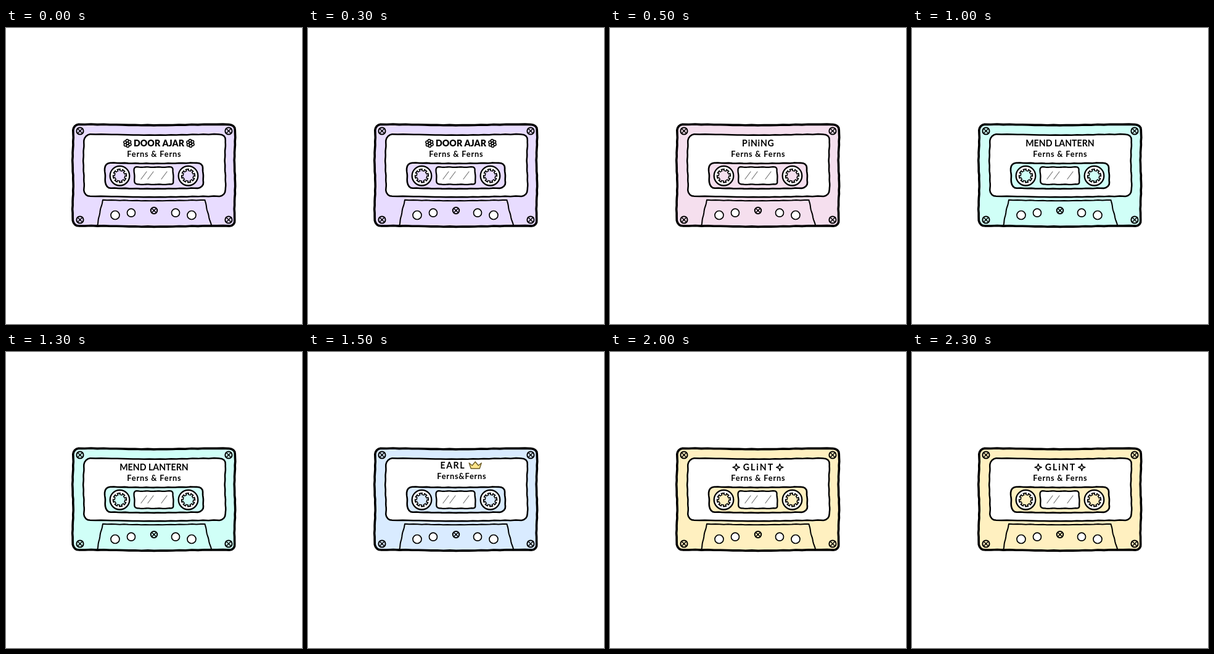
Write an HTML page with a canvas that moves like this. It is 480 by 480 pixels and loops after 2.5 s.

```html
<!DOCTYPE html>
<html lang="en">
<head>
<meta charset="utf-8">
<title>Cassettes</title>
<style>
  html, body { margin: 0; width: 100%; height: 100%; overflow: hidden; background: #fff; }
  canvas { display: block; }
</style>
</head>
<body>
<canvas id="stage" width="480" height="480"></canvas>
<script>
const ctx = document.getElementById('stage').getContext('2d');
const SIZE = 480, MID = SIZE / 2, HOLD = 500, TAU = Math.PI * 2;
const INK = '#000', PAPER = '#fff';

const tapes = [
  { tint: '#e8dcff', title: 'DOOR AJAR', x: 248, weight: 900, ornament: flower, paired: true },
  { tint: '#f5dfee', title: 'PiNiNG', gap: 0.8 },
  { tint: '#d0fff7', title: 'MEND LANTERN' },
  { tint: '#d9ebff', title: 'EARL', x: 234, gap: 1.5, lift: 3, ornament: crown,
    artist: 'Ferns&Ferns', artistX: 249 },
  { tint: '#fff0c0', title: 'GLiNT', gap: 2, ornament: sparkle, paired: true }
];

const polar = (x, y, r, a) => [x + r * Math.cos(a), y + r * Math.sin(a)];

function paint(fill, width, color = INK) {
  if (fill) { ctx.fillStyle = fill; ctx.fill(); }
  if (width) { ctx.strokeStyle = color; ctx.lineWidth = width; ctx.stroke(); }
}

function poly(points, closed = true) {
  ctx.beginPath();
  for (const [x, y] of points) ctx.lineTo(x, y);
  if (closed) ctx.closePath();
}

function line(from, to, width, color) {
  poly([from, to], false);
  paint(null, width, color);
}

function disc(x, y, r, fill, width) {
  ctx.beginPath();
  ctx.arc(x, y, r, 0, TAU);
  paint(fill, width);
}

// A smooth displacement that makes long lines look drawn by hand.
function unsteady([x, y]) {
  return [
    x + 0.6 * Math.sin(y * 0.08) + 0.25 * Math.sin(y * 0.4),
    y + 0.7 * Math.cos((x - MID) * 0.03) + 0.25 * Math.sin(x * 0.35)
  ];
}

function sketch(corners, closed = true) {
  const points = [], steps = 24;
  corners.forEach(([x, y], i) => {
    const next = corners[i + 1] || (closed ? corners[0] : [x, y]);
    for (let s = 0; s < steps; s++) {
      const k = s / steps;
      points.push(unsteady([x + (next[0] - x) * k, y + (next[1] - y) * k]));
    }
  });
  poly(points, closed);
}

function box(left, top, right, bottom, radius, fill, width) {
  const points = [], arcSteps = 4;
  for (let corner = 0; corner < 4; corner++) {
    const x = corner % 3 ? right - radius : left + radius;
    const y = corner < 2 ? top + radius : bottom - radius;
    for (let s = 0; s <= arcSteps; s++)
      points.push(polar(x, y, radius, (corner + 2 + s / arcSteps) * TAU / 4));
  }
  sketch(points);
  paint(fill, width);
}

function screw(x, y, r, tint) {
  disc(x, y, r, tint, 2);
  for (let i = 0; i < 2; i++) {
    const a = (i + 0.5) * TAU / 4;
    line(polar(x, y, r * 0.75, a), polar(x, y, -r * 0.75, a), 1.6);
  }
}

function reel(x, y, tint) {
  disc(x, y, 15.8, PAPER, 2.3);
  disc(x, y, 10.8, tint, 1.8);
  const notches = 8;
  ctx.lineCap = 'butt';
  for (const [inner, outer, width, color] of [[7.5, 11, 5, INK], [9, 13, 2.2, PAPER]])
    for (let i = 0; i < notches; i++) {
      const a = (i + 0.3) * TAU / notches;
      line(polar(x, y, inner, a), polar(x, y, outer, a), width, color);
    }
  ctx.lineCap = 'round';
}

function flower(x, y) {
  const petals = 6;
  for (let i = 0; i < petals; i++)
    disc(...polar(x, y, 4.2, (i + 0.4) * TAU / petals), 2.2, PAPER, 1.6);
  disc(x, y, 2, PAPER, 1.5);
}

function sparkle(x, y) {
  const points = [];
  for (let i = 0; i < 8; i++) points.push(polar(x, y, i % 2 ? 2 : 5.5, i * TAU / 8));
  poly(points);
  paint(PAPER, 1.6);
}

function crown(x, y) {
  const points = [[x + 7, y + 2], [x - 7, y + 2]];
  for (let i = -2; i <= 2; i++)
    points.push([x + i * 5, y - (i % 2 ? 3 : i ? 7 : 9)]);
  poly(points);
  paint('#ffe58a', 1.4, '#6b5a24');
}

function write(text, x, y, size, weight, gap) {
  ctx.font = `${weight} ${size}px Lato, sans-serif`;
  ctx.letterSpacing = gap + 'px';
  ctx.textAlign = 'center';
  ctx.fillStyle = INK;
  ctx.fillText(text, x + gap / 2, y);
  return ctx.measureText(text).width;
}

function drawShell(tint) {
  box(108.5, 157, 371, 321.5, 9, tint, 3.6);
  box(126, 173, 355.5, 273.5, 10, PAPER, 2.5);
  box(160.5, 219, 319.5, 260, 9, tint, 2.6);
  box(208, 225, 271, 253, 4, PAPER, 2.3);
  for (const x of [219, 230, 252]) line([x, 245], [x + 9, 233], 1.2, '#777');

  sketch([[148, 320], [157.5, 279.5], [323, 279.5], [332.5, 320]], false);
  paint(null, 2);

  for (const side of [-1, 1]) {
    reel(MID + side * 55.5, 239.7, tint);
    disc(MID - 1 + side * 62, 303.5, 7, PAPER, 1.7);
    disc(MID - 1 + side * 36, 299.7, 6.5, PAPER, 1.7);
    for (const y of [167, 311]) screw(MID + 0.5 + side * 120.5, y, 5.6, tint);
  }
  screw(MID, 296, 5.2, tint);
}

function drawLabel({ title, x = MID, weight = 700, gap = 0, lift = 0, ornament, paired,
                     artist = 'Ferns & Ferns', artistX = MID }) {
  const y = 192 - lift;
  const width = write(title, x, y, 14.2, weight, gap);
  write(artist, artistX, 209 - lift, 12.8, 700, 0.8);
  if (!ornament) return;
  if (paired) {
    for (const side of [-1, 1]) ornament(x + side * (width / 2 + 10), y - 5);
  } else {
    ornament(x + width / 2 + 17, y - 2);
  }
}

function draw(time) {
  const tape = tapes[Math.floor(time / HOLD) % tapes.length];
  ctx.fillStyle = PAPER;
  ctx.fillRect(0, 0, SIZE, SIZE);
  drawShell(tape.tint);
  drawLabel(tape);
}

ctx.lineCap = ctx.lineJoin = 'round';
const start = performance.now();
function tick() {
  draw(performance.now() - start);
  requestAnimationFrame(tick);
}
tick();
</script>
</body>
</html>
```
